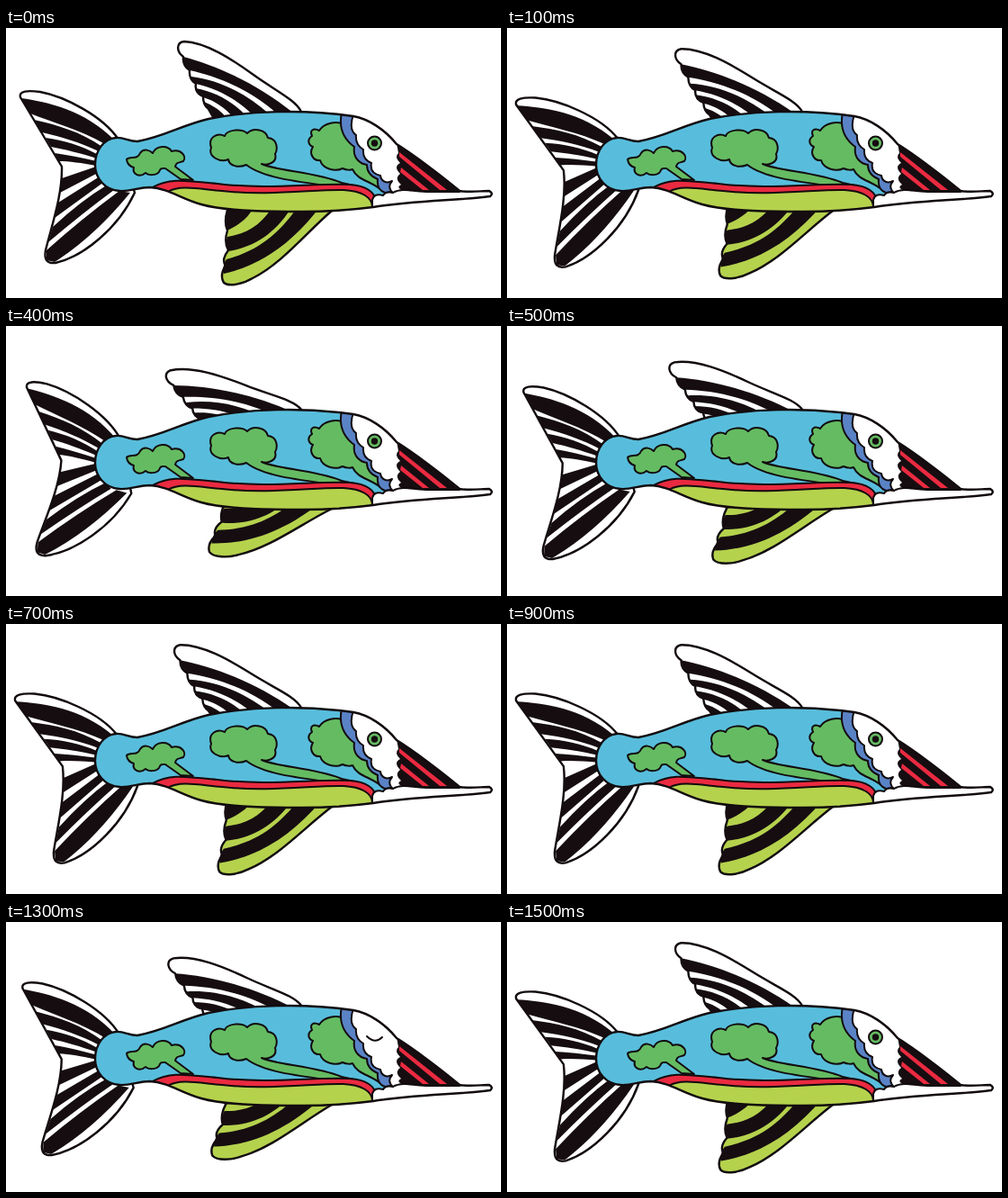
Recreate the animation shown at these times as an HTML page. Size 550 px wide and 300 px high, loop 1.6 s.

```html
<!DOCTYPE html>
<html lang="en">
<head>
<meta charset="utf-8">
<title>Swimming fish</title>
<style>
html, body { margin: 0; height: 100%; overflow: hidden; background: #fff; }
svg { display: block; }
.line { fill: none; stroke: #120b0e; stroke-width: 2; stroke-linejoin: round; stroke-linecap: round; }
.outer { stroke-width: 2.4; }
.white { fill: #fff; }
.ink { fill: #160d11; }
.blue { fill: #58bddc; }
.green { fill: #65bb62; }
.lime { fill: #b5d24d; }
.red { fill: #ea2a40; }
.cheek { fill: #5a83c6; }
</style>
</head>
<body>
<svg width="550" height="300" viewBox="0 0 550 300">
  <defs>
    <path id="bodyShape" d="M146 126C175 121 195 108 225 101C270 92 330 90 386 98C403 101 421 113 434 129C452 140 485 165 504 181C515 183 528 181 537 181Q542 184 538 187C500 192 460 191 408 199C385 202 355 204 330 204C300 204 245 204 217 196C195 190 180 178 160 177C147 177 138 182 126 181C110 180 99 167 99 152C99 136 109 123 122 122C131 121 136 126 146 126Z"/>
    <clipPath id="bodyClip"><use href="#bodyShape"/></clipPath>
  </defs>

  <g id="tail">
    <path class="line outer white" d="M125 124C108 98 65 76 38 71C24 69 14 70 16 77L62 154C63 185 50 222 44 247C42 258 46 262 55 261C86 254 125 222 143 183Z"/>
    <path class="ink" d="M17 78C45 82 88 91 121 125L110 129C82 113 52 105 27 95Z
      M31 102C58 108 82 115 107 132L103 137C82 127 62 121 40 116Z
      M44 122C65 125 82 130 103 141L101 145C82 139 66 135 50 132Z
      M54 139C68 141 84 144 101 148L101 153C84 150 70 148 59 148Z
      M62 167L100 154L102 161L60 183Z
      M58 194L104 165L109 171L54 211Z
      M52 221Q83 192 113 174L120 180Q86 205 47 238Z
      M45 247Q84 212 126 181L138 183Q98 232 54 260L45 258Z"/>
  </g>

  <g id="topFin">
    <path class="line outer white" d="M328 93C322 80 300 70 275 52C250 34 222 16 198 15C189 16 189 26 197 32Q196 42 204 47Q203 57 211 62Q209 71 219 76Q219 86 225 90L234 106L300 110Z"/>
    <path class="ink" d="M197 32C232 41 278 61 319 94L301 95C270 67 232 53 204 47Q196 42 197 32Z
      M206 54C236 58 265 71 294 97L277 99C256 78 235 68 211 62Q204 60 206 54Z
      M211 67C232 71 252 81 268 99L254 101C243 88 232 81 219 77Q210 74 211 67Z
      M220 82Q236 88 246 101L232 104L224 90Z"/>
  </g>

  <g id="bottomFin">
    <path class="line outer lime" d="M246 185V202Q242 216 246 225Q242 238 247 247Q239 257 244 264Q237 275 242 283C248 288 264 284 274 278C306 262 332 229 362 203L340 185Z"/>
    <path class="ink" d="M246 190L278 192C272 210 260 218 246 225Q243 215 246 202Z
      M246 232C270 228 286 217 299 194L319 196C302 227 275 244 247 248Q243 240 246 232Z
      M245 257C282 247 305 227 326 196L350 197C318 240 282 264 242 273Q240 264 245 257Z"/>
  </g>

  <use href="#bodyShape" class="blue"/>
  <g clip-path="url(#bodyClip)">
    <g class="line">
      <path class="green" d="M134 146C138 142 146 147 149 139C153 133 160 136 163 139C167 130 180 130 184 137C195 134 201 143 197 148C192 150 189 149 188 154L208 169L194 168L177 156C173 156 172 155 170 160C167 164 158 164 155 161C148 167 140 162 142 155Q135 153 134 146Z"/>
      <path class="green" d="M284 151C301 159 345 160 373 172L396 177H372C325 171 286 167 267 152C258 156 248 153 247 146C238 150 224 143 228 133C224 121 235 116 243 120C245 113 262 111 268 117C275 110 289 113 291 122C302 123 302 135 299 140C302 150 290 153 284 151Z"/>
      <path class="green" d="M380 108C366 102 353 106 348 114C342 111 337 113 340 120C334 124 336 130 341 132C336 140 342 148 349 147C352 157 366 160 374 156C378 158 383 158 385 157C391 170 405 169 420 182L430 170L395 120Z"/>
      <path class="red" d="M163 177C185 165 205 171 235 173C290 180 345 172 382 174C400 175 411 183 410 192L407 210H220Z"/>
      <path class="lime" d="M180 182C193 174 215 179 240 181C290 187 345 179 375 180C395 181 407 188 407 199V215H220Z"/>
      <path class="cheek" d="M373 94C369 113 376 124 387 132C385 145 394 151 401 152C401 162 408 166 413 168C412 177 415 181 421 183L440 180L400 95Z"/>
      <path class="white" d="M386 96C382 108 383 115 389 119C388 128 392 132 397 135C396 144 401 148 406 150C404 160 411 163 416 164C417 171 423 173 429 170Q423 177 430 183Q422 181 419 186Q409 183 407 191V210H550V90Z"/>
    </g>
    <path class="ink" d="M434 128C452 139 485 165 504 182C480 181 455 183 440 180Q433 177 439 174Q431 167 438 162Q430 154 438 150Q431 143 436 139Z"/>
    <path class="red" d="M437 138L490 180H482L437 143Z M439 155L470 180H463L438 160Z"/>
    <path class="line" d="M430 183C440 177 454 182 470 182H504"/>
  </g>
  <use href="#bodyShape" class="line outer"/>

  <g id="openEye">
    <circle class="line green" cx="409.500" cy="128" r="7.500"/>
    <circle class="ink" cx="409.500" cy="128" r="3.700"/>
  </g>
  <g id="halfEye">
    <path class="line green" d="M401 128Q410 120 418 128Q410 136 401 128Z"/>
    <ellipse class="ink" cx="409.500" cy="128" rx="3.500" ry="2.300"/>
  </g>
  <path id="closedEye" class="line" d="M401 127Q410 136 418 128"/>
</svg>
<script>
const el = id => document.getElementById(id);
const turn = (id, angle, x, y) => el(id).setAttribute('transform', `rotate(${angle} ${x} ${y})`);
const show = (id, visible) => { el(id).style.display = visible ? '' : 'none'; };

const FIN_STEP = 3.55;
const tailAngles = [0, -5, -1.5, 2, 5.5];
const blink = { 11: 'halfEye', 12: 'closedEye', 13: 'closedEye', 14: 'halfEye' };

function draw(now) {
  const step = Math.floor((now % 1600) / 100);
  const stroke = 4 - Math.abs(4 - step % 8); // 0 to 4 and back
  turn('topFin', -FIN_STEP * stroke, 328, 92);
  turn('bottomFin', FIN_STEP * stroke, 362, 203);
  turn('tail', tailAngles[stroke], 110, 146);
  const eye = blink[step] || 'openEye';
  for (const id of ['openEye', 'halfEye', 'closedEye']) show(id, id === eye);
}

const start = performance.now();
function tick() {
  draw(performance.now() - start);
  requestAnimationFrame(tick);
}
tick();
</script>
</body>
</html>
```
